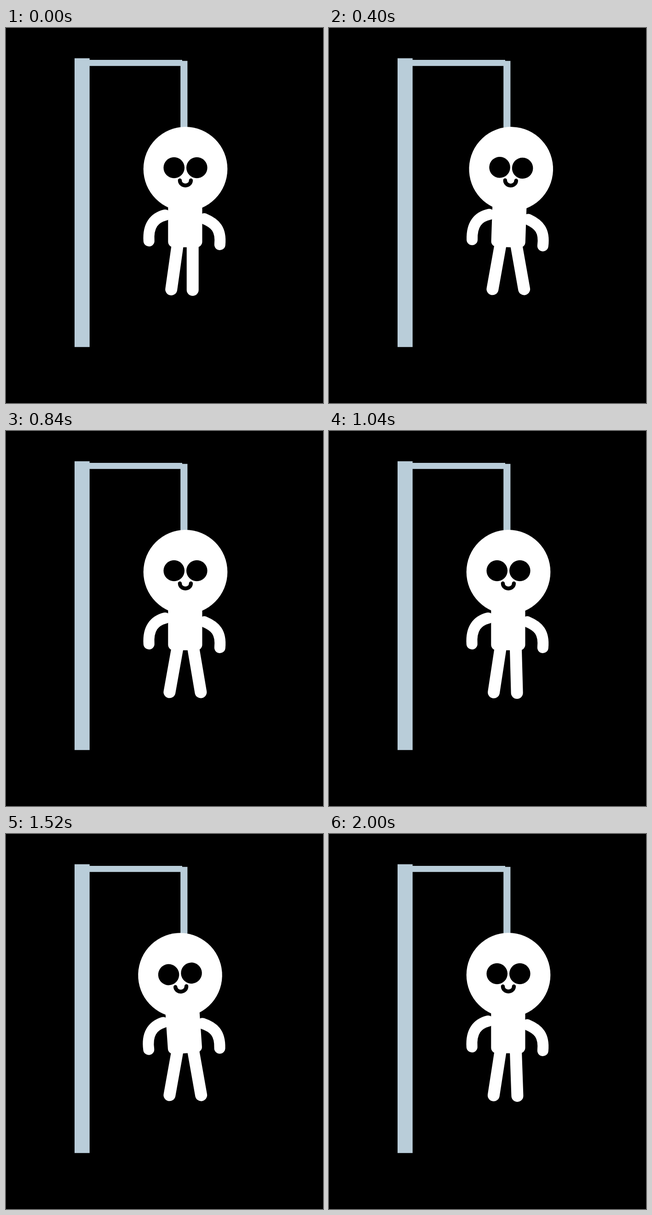
These frames come from a looping animation (689x812 px, 2040 ms). An HTML page with a canvas:

```html
<!DOCTYPE html>
<html>
<head>
<meta charset="utf-8">
<style>
html, body { margin: 0; width: 100%; height: 100%; overflow: hidden; background: #000; }
canvas { display: block; }
</style>
</head>
<body>
<canvas id="stage" width="689" height="812"></canvas>
<script>
const ctx = document.getElementById('stage').getContext('2d');
const LOOP = 2040, STEP = 40;
const RAD = Math.PI / 180;

// eased 0..1 between two ticks
function ease(t, from, to) {
  const x = Math.min(1, Math.max(0, (t - from) / (to - from)));
  return x * x * (3 - 2 * x);
}

// rises over a..b, falls over c..d
const pulse = (t, a, b, c, d) => ease(t, a, b) - ease(t, c, d);

function disc(x, y, r, color) {
  ctx.fillStyle = color;
  ctx.beginPath();
  ctx.arc(x, y, r, 0, Math.PI * 2);
  ctx.fill();
}

function stroke(width, color, trace) {
  ctx.lineWidth = width;
  ctx.strokeStyle = color;
  ctx.lineCap = 'round';
  ctx.beginPath();
  trace();
  ctx.stroke();
}

function gallows() {
  ctx.fillStyle = '#b9cdd9';
  ctx.fillRect(149, 65.5, 32.7, 625.3);
  ctx.fillRect(181, 69, 202, 13.2);
  ctx.fillRect(379.2, 71.2, 15.2, 155);
}

function leg(x, angle) {
  const y = 462, len = 105, a = angle * RAD;
  stroke(26, '#fff', () => {
    ctx.moveTo(x, y);
    ctx.lineTo(x + len * Math.sin(a), y + len * Math.cos(a));
  });
}

function torso(tilt) {
  ctx.save();
  ctx.translate(389.5, 470);
  ctx.rotate(tilt * RAD);
  ctx.translate(-389.5, -470);

  ctx.fillStyle = '#fff';
  ctx.beginPath();
  ctx.roundRect(352.3, 370, 74.2, 104.7, [0, 0, 12, 12]);
  ctx.fill();

  stroke(24, '#fff', () => {
    ctx.moveTo(346, 405);
    ctx.bezierCurveTo(322, 411, 308.5, 428, 310.7, 461);
  });
  stroke(24, '#fff', () => {
    ctx.moveTo(431, 413);
    ctx.bezierCurveTo(455, 423, 468, 436, 464.8, 469);
  });

  disc(390, 305.3, 91.3, '#fff');
  disc(365.2, 302.5, 22.8, '#000');
  disc(414.8, 302.5, 22.8, '#000');
  stroke(8.4, '#000', () => ctx.ellipse(389.9, 330, 12, 11, 0, Math.PI, 0, true));
  ctx.restore();
}

function draw(t) {
  const open = pulse(t, 1.26, 9.26, 20, 28) + pulse(t, 29.26, 37.26, 44.3, 52.3);
  const tilt = 5.6 * pulse(t, 7.3, 14, 15, 21) - 5.1 * pulse(t, 33.3, 40, 40.1, 46.1);

  ctx.fillStyle = '#000';
  ctx.fillRect(0, 0, 689, 812);
  gallows();
  leg(374, -8.1 - 2.1 * open * (2 - open));
  leg(405.7, 10.1 * open);
  torso(tilt);
}

const start = performance.now();
function tick() {
  const ms = Math.max(0, performance.now() - start) % LOOP;
  draw(Math.floor(ms / STEP));
  requestAnimationFrame(tick);
}
tick();
</script>
</body>
</html>
```
